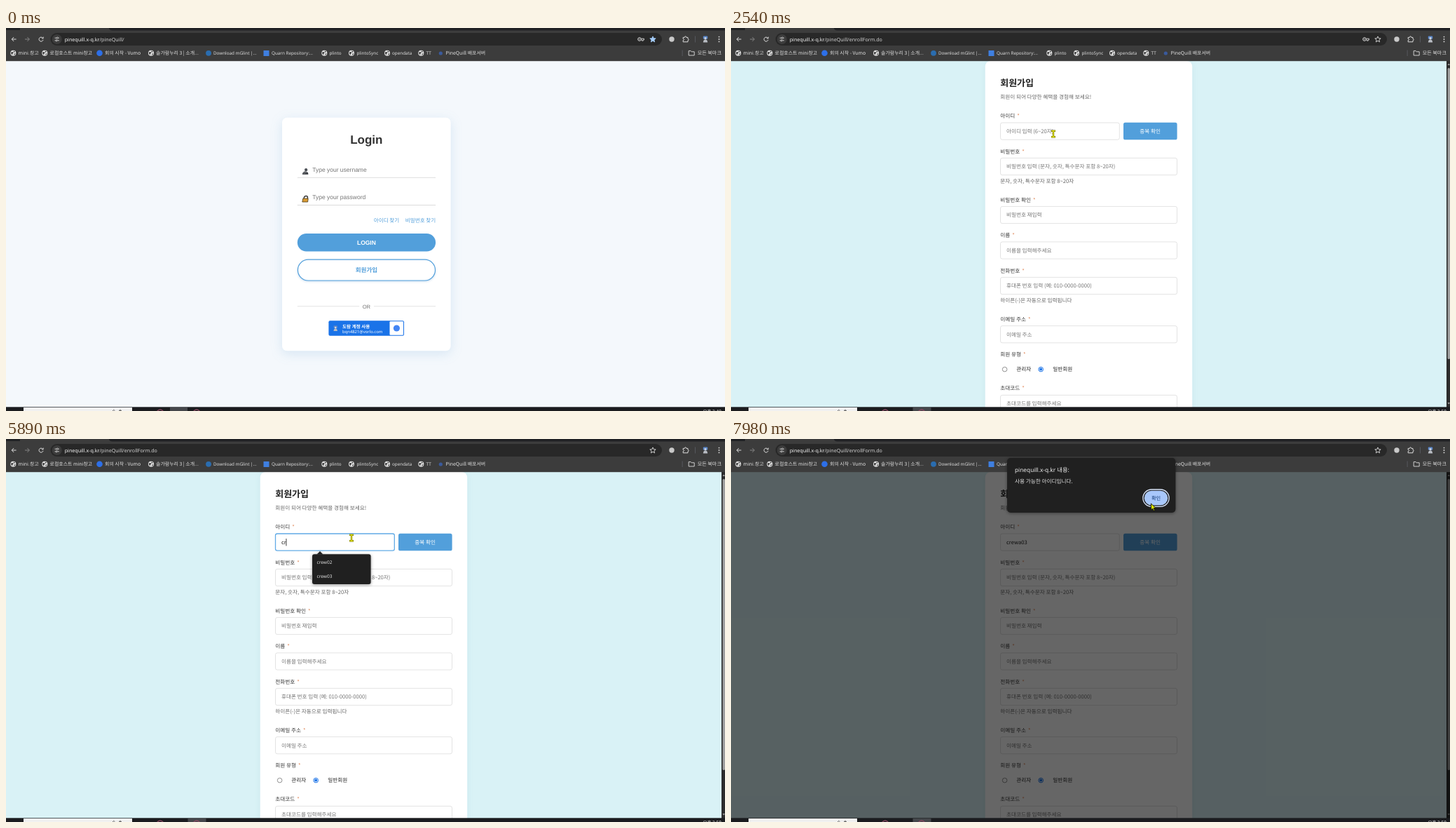
These frames come from a looping animation (1026x546 px, 8000 ms). An HTML page:

```html
<!DOCTYPE html>
<html>
<head>
<meta charset="utf-8">
<title>Sign-up walkthrough</title>
<style>
html, body { margin: 0; width: 100%; height: 100%; overflow: hidden; background: #f4f8fc; }
svg { display: block; width: 100vw; height: 100vh; }
text { text-rendering: geometricPrecision; white-space: pre; }
.kr { font-family: "Noto Sans CJK KR", "Noto Sans CJK", "Noto Sans", sans-serif; }
.ui { font-family: "Noto Sans", "Noto Sans CJK KR", "Noto Sans CJK", sans-serif; }
.ar { font-family: "Liberation Sans", Arial, sans-serif; }
.mid { text-anchor: middle; }
.b { font-weight: 700; }
.m { font-weight: 500; }
#loginCard { filter: drop-shadow(0 4px 8px rgba(70, 140, 200, .17)); }
#formCard { filter: drop-shadow(0 2px 4px rgba(40, 110, 130, .08)); }
#join { filter: drop-shadow(0 1px 1.5px rgba(70, 140, 200, .3)); }
#box, #list { filter: drop-shadow(0 1px 2px rgba(0, 0, 0, .4)); }
</style>
</head>
<body>
<svg id="stage" viewBox="0 0 1026 546" preserveAspectRatio="none"></svg>
<script>
const LOOP = 8000;
const BLUE = '#529fdb';
const BODY = 7.62;
const HOST = 'pinequill.x-q.kr';
const TYPED = 'crewa03';
const NAMES = ['owner', 'ownera', 'ownerb', 'crew02', 'crew03', 'demo01'];

// --- drawing helpers
const text = (x, y, s, size, fill, cls = 'kr', more = '') =>
  `<text x="${x}" y="${y}" font-size="${size}" fill="${fill}" class="${cls}" ${more}>${s}</text>`;
const rect = (x, y, w, h, fill, rx = 0, more = '') =>
  `<rect x="${x}" y="${y}" width="${w}" height="${h}" fill="${fill}" rx="${rx}" ${more}/>`;
const disc = (x, y, r, fill, more = '') =>
  `<circle cx="${x}" cy="${y}" r="${r}" fill="${fill}" ${more}/>`;
const line = (d, stroke, w = 1, more = '') =>
  `<path d="${d}" fill="none" stroke="${stroke}" stroke-width="${w}" ${more}/>`;
const shape = (d, fill, more = '') => `<path d="${d}" fill="${fill}" ${more}/>`;
const group = (id, body, more = '') => `<g id="${id}" ${more}>${body}</g>`;
const at = (x, y, body) => `<g transform="translate(${x} ${y})">${body}</g>`;

const globe = x => at(x, 35.7, disc(0, 0, 4, '#e3e3e3') +
  shape('M-3.2-1.2L-.6-1.6L.2 0L-1.2 1L-1 2.9Q-3.4 1.6-3.2-1.2ZM.6-3.2L2.6-2.2L1.4-.8L.4-1.8ZM1.2 1L3.2.6Q2.8 2.4 1.2 3Z', '#3c3c3c'));

const portrait = (x, y, k) => `<g transform="translate(${x} ${y}) scale(${k})">` +
  rect(-3.2, -4.6, 6.4, 4.4, '#5b87c9', 1) + disc(0, -1.4, 1.5, '#d7dbe2') +
  shape('M-3.2 4.4Q-2.6 .2 0 .2T3.2 4.4Z', '#b9bdc4') + '</g>';

const starPath = (x, y, r) => 'M' + Array.from({ length: 10 }, (_, i) => {
  const a = i * Math.PI / 5, q = i % 2 ? r * .45 : r;
  return (x + q * Math.sin(a)).toFixed(2) + ' ' + (y - q * Math.cos(a)).toFixed(2);
}).join('L') + 'Z';

// --- browser frame
function browser() {
  const ink = '#dedede';
  const marks = [
    [17.5, 'mini.창고'], [62.5, '로컬호스트 mini창고'], [141, '회의 시작 - Vumo'],
    [214, '솔가람누리 3 | 소개...'], [296, 'Download mGlint |...'], [379, 'Quarn Repository:...'],
    [461.5, 'plinto'], [500.5, 'plintoSync'], [551, 'opendata'], [599.5, 'TT'], [627.5, 'PineQuill 배포서버'],
  ];
  const hangul = /[가-힣]/;
  return rect(0, 0, 1026, 47.2, '#3c3c3c') + rect(0, 0, 20, 3, '#202124') +
    shape('M147 0H1026V3.4H152Q147 3.4 147 0Z', '#202124') +
    rect(63.5, 7, 872.5, 18, '#282828', 9) + disc(72.7, 16, 7, '#3c3c3c') +
    line('M14.6 16H8.4M11.2 13L8.2 16L11.2 19', ink, 1) +
    line('M27 16H33.2M30.4 13L33.4 16L30.4 19', '#858585', 1) +
    line('M52.4 14.2A3 3 0 1 0 53 16.8M53.2 12.6V14.8H51', ink, 1) +
    line('M69.6 14.2H72M74.8 14.2H75.8M69.6 17.8H70.6M73.4 17.8H75.8', ink, .9) +
    disc(73.4, 14.2, 1.1, 'none', `stroke="${ink}" stroke-width=".8"`) +
    disc(72, 17.8, 1.1, 'none', `stroke="${ink}" stroke-width=".8"`) +
    `<text x="83.7" y="18.6" font-size="7.1" class="ui" fill="#f4f4f4">${HOST}<tspan id="path" fill="#d0d0d0"></tspan></text>` +
    group('key', disc(904, 16, 2.3, 'none', `stroke="${ink}" stroke-width="1"`) + disc(904, 16, .7, ink) +
      line('M906.4 15.2H910.4V17H909.2V18.2H907.6V17H906.4', ink, .9)) +
    `<path id="fav" d="${starPath(923, 16.3, 4.4)}" stroke-width=".9"/>` +
    disc(950, 16, 3.7, '#c9c9c9') +
    line('M966.2 13.4H968.4Q968.6 11.8 969.6 11.8T970.8 13.4H973V15.4Q974.2 15.6 974.2 16.6T973 17.8V19.8H966.2V17.6Q967.6 17.4 967.6 16.5T966.2 15.4Z', ink, 1) +
    rect(983.2, 11.5, .8, 9, '#5c5f66') + portrait(998, 16, 1) +
    [12.6, 16, 19.4].map(y => disc(1017.5, y, .9, ink)).join('') +
    [10.3, 55.3, 207, 454.3, 493, 544, 592.3].map(globe).join('') +
    disc(133.5, 35.8, 4.3, '#2d6fe8') + disc(289, 35.8, 3.9, '#2a6db0') +
    rect(367.5, 32, 8, 8, '#3f7fe0') + disc(620.3, 36, 2.6, '#3a5a9c') +
    marks.map(([x, s]) => hangul.test(s)
      ? text(x, 38.2, s, 6.95, ink) : text(x, 38, s, 6.3, ink, 'ui')).join('') +
    rect(964.7, 31.5, .8, 8.5, '#5c5f66') +
    line('M974.2 32.6H977.2L978.2 33.8H982.2V39H974.2Z', ink, .9) +
    text(986.7, 38.2, '모든 북마크', 7.1, ink);
}

// --- login page
function login() {
  const user = disc(.9, -2.2, 2.1, '#4b4f55') + shape('M-4.4 4.4Q-4 .4 0 .2T4.2 4.4Z', '#33363b') +
    line('M-3 2.6L3.4 1', '#b9bcc2', .7);
  const lock = line('M-2.2 0Q-2-4.2 1-4.2T3-.4', '#3a3a3a', 1.5) +
    shape('M-3.4-.6H4L3.4 4.4H-4.4Z', '#d99a32', 'stroke="#4a3a1c" stroke-width=".8"');
  return rect(0, 47, 1026, 494, '#f4f8fc') +
    group('loginCard', rect(394, 127.7, 240.6, 332.6, '#fff', 7)) +
    text(514.3, 164.6, 'Login', 17, '#333', 'ar b mid') +
    at(427.2, 204.4, user) + at(427.2, 243.6, lock) +
    text(437.2, 204.5, 'Type your username', 8.5, '#757575', 'ar') +
    text(437.2, 243.6, 'Type your password', 8.5, '#757575', 'ar') +
    rect(415.8, 212.8, 197.3, .8, '#d4d4d4') + rect(415.8, 252, 197.3, .8, '#d4d4d4') +
    text(524.8, 277.2, '아이디 찾기', 7.55, BLUE) + text(569.8, 277.2, '비밀번호 찾기', 7.55, BLUE) +
    rect(415.8, 293, 197.3, 25.6, BLUE, 12.8) + text(514.4, 308.6, 'LOGIN', 8.5, '#fff', 'ar b mid') +
    rect(416.4, 330.2, 196.1, 29.8, '#fff', 14.9, `id="join" stroke="${BLUE}" stroke-width="1.2"`) +
    text(514.4, 348.2, '회원가입', 8.5, BLUE, 'kr b mid') +
    rect(415.8, 396.4, 88.4, .8, '#dcdcdc') + rect(525, 396.4, 88.1, .8, '#dcdcdc') +
    text(514.4, 399.8, 'OR', 7.6, '#777', 'ar mid') +
    rect(460.4, 417.2, 107.6, 21.6, '#1a73e8', 2) + rect(547.5, 418.2, 19.5, 19.6, '#fff', 1.2) +
    disc(557.4, 428, 4.6, '#4285f4') + portrait(470.2, 428.2, .85) +
    text(480, 427.5, '도람 계정 사용', 6.6, '#fff', 'kr b') +
    text(480, 434.8, 'bqn4821@vorlo.com', 5.9, '#fff', 'ui');
}

// --- sign-up page: [label, label centre, field top, placeholder, hint]
const FIELDS = [
  ['아이디', 125.5, 135, '아이디 입력 (6~20자)'],
  ['비밀번호', 176, 185.4, '비밀번호 입력 (문자, 숫자, 특수문자 포함 8~20자)', '문자, 숫자, 특수문자 포함 8~20자'],
  ['비밀번호 확인', 245, 254.4, '비밀번호 재입력'],
  ['이름', 295.5, 304.9, '이름을 입력해주세요'],
  ['전화번호', 346, 355.4, '휴대폰 번호 입력 (예: 010-0000-0000)', '하이픈(-)은 자동으로 입력됩니다'],
  ['이메일 주소', 415, 424.6, '이메일 주소'],
  ['회원 유형', 465.4],
  ['초대코드', 513.6, 523.4, '초대코드를 입력해주세요'],
];
const fieldWidth = i => i ? 252 : 169.8;

function signup() {
  let s = rect(0, 47, 1026, 494, '#d9f2f6') +
    group('formCard', rect(362.7, 47, 295.5, 520, '#fff', 8)) +
    text(384.2, 83.4, '회원가입', 13, '#222', 'kr b') +
    text(384.2, 101.2, '회원이 되어 다양한 혜택을 경험해 보세요!', BODY, '#666');
  FIELDS.forEach(([label, mid, top, hint, note], i) => {
    s += text(384.2, mid + 2.7, `${label}<tspan dx="3" fill="#e08a5c" font-weight="400">*</tspan>`, BODY, '#333', 'kr m');
    if (!top) return;
    s += rect(384.5, top, fieldWidth(i), 24.2, '#fff', 2.6, `stroke="#d0d0d0" stroke-width=".6" ${i ? '' : 'id="idField"'}`) +
      text(392.9, top + 14.9, hint, BODY, '#757575', 'kr', i ? '' : 'id="idText"');
    if (note) s += text(384.2, top + 35.6, note, BODY, '#666');
  });
  return s + rect(392.7, 142, .8, 10.4, '#111', 0, 'id="caret"') +
    rect(560, 134.8, 76.6, 24.5, BLUE, 2.6) + text(598.2, 149.9, '중복 확인', BODY, '#fff', 'kr m mid') +
    disc(390.6, 486.6, 3.3, '#fff', 'stroke="#767676" stroke-width=".8"') +
    disc(442.2, 486.6, 3.3, '#fff', 'stroke="#1a73e8" stroke-width="1"') + disc(442.2, 486.6, 2, '#1a73e8') +
    text(407.2, 489.4, '관리자', BODY, '#222', 'kr m') + text(459.2, 489.4, '일반회원', BODY, '#222', 'kr m') +
    rect(1021, 47, 5, 494, '#2c2c2c') + rect(1022.6, 57, 3.4, 415, '#9f9f9f', 1.6) +
    shape('M1022.4 53L1024.3 50.4L1026 53ZM1022.4 534L1024.3 536.6L1026 534Z', '#9f9f9f');
}

const dropdown = () => rect(437, 164.2, 83.6, 120, '#202020', 3, 'id="panel"') +
  shape('M443.6 164.6L448 160L452.4 164.6Z', '#202020') +
  NAMES.map((_, i) => text(443.6, 178.2 + i * 19.3, '', 6.5, '#e3e3e3', 'ui', `id="name${i}"`)).join('');

const alertBox = () => group('box', rect(394, 27, 240.4, 78, '#202020', 5)) +
  text(405, 46.8, HOST + ' 내용:', 8.3, '#ececec', 'ui') +
  text(405, 62.7, '사용 가능한 아이디입니다.', BODY, '#e3e3e3') +
  rect(587.9, 72, 37.2, 24.4, '#202020', 12.2, 'stroke="#dbe7fd" stroke-width="1.3"') +
  rect(589.8, 73.8, 33.4, 20.8, '#a8c7fa', 10.4) +
  text(606.5, 86.8, '확인', 7.2, '#0b3470', 'kr mid');

const taskbar = () => rect(0, 540.3, 1026, 6, '#1b1c1f') + rect(25, 541, 155, 5, '#f1f1f1') +
  line('M152 546L153.8 544.4L155.6 546M161 545.4H165M163 543.8V546', '#555', .9) +
  rect(234, 541, 25, 5, '#45474b', 0, 'id="taskA"') + rect(259.5, 541, 26, 5, '#45474b', 0, 'id="taskB"') +
  [220, 272].map(x => line(`M${x - 4.5} 546.5Q${x} 541.6 ${x + 4.5} 546.5`, '#8a4a62', 1.4)).join('') +
  text(994.5, 548.6, '', 6.6, '#eee', 'kr', 'id="clock"');

const edge = 'stroke="#111" stroke-width=".9" stroke-linejoin="round"';
const pointers = () => disc(0, 1.5, 6.2, 'rgba(255,255,0,.45)', 'id="spot"') +
  shape('M0 0V9.2L2.2 7.2L3.7 10.3L5.2 9.6L3.8 6.6H6.8Z', '#dde600', edge + ' id="arrow"') +
  shape('M-1 .8Q0-.8 1 .8V4L5.2 5Q6.2 5.4 5.9 6.8L5 10.6H.4L-2.8 6.6Q-2.6 5.2-1 6.2Z', '#f0f000', edge + ' id="hand"') +
  group('ibeam', line('M-3-4.3H3M0-4.3V4.3M-3 4.3H3', '#6b6b00', 2.4) + line('M-2.6-4.3H2.6M0-4.3V4.3M-2.6 4.3H2.6', '#e4e400', 1.3));

document.getElementById('stage').innerHTML =
  group('login', login()) + group('signup', signup()) + group('list', dropdown()) +
  rect(0, 47, 1026, 494, 'rgba(0,0,0,.6)', 0, 'id="scrim"') +
  browser() + taskbar() + group('alert', alertBox()) + group('cursor', pointers());

const $ = id => document.getElementById(id);
const show = (id, on) => $(id).setAttribute('display', on ? 'inline' : 'none');
const set = (id, map) => { for (const k in map) $(id).setAttribute(k, map[k]); };

// --- pointer: [start, end, steps, from, bend, to]
const MOVES = [
  [70, 510, 7, [640, 556], [570, 400], [560, 363]],
  [770, 1250, 8, [560, 363], [535, 328], [536, 347]],
  [2060, 2540, 8, [536, 347], [500, 200], [460, 151]],
  [2800, 2940, 3, [460, 151], [700, 160], [1034, 212]],
  [4990, 5390, 7, [640, 556], [540, 190], [493, 141]],
  [6500, 6840, 6, [493, 141], [560, 150], [604.2, 150.2]],
  [6970, 7250, 5, [604.2, 150.2], [602, 134], [596, 124]],
  [7310, 7770, 7, [596, 124], [550, 98], [596, 91]],
  [7980, 7981, 1, [596, 91], [598, 92], [599.4, 92]],
];

function pointerAt(t) {
  const move = MOVES.filter(m => m[0] <= t).pop();
  if (!move) return [640, 570];
  const [a, b, n, p, c, q] = move;
  const k = Math.floor((Math.min(t, b) - a) / (b - a) * (n - 1) + 1e-6);
  const u = (k + 1) / n, v = 1 - u;
  return [0, 1].map(i => v * v * p[i] + 2 * u * v * c[i] + u * u * q[i]);
}

const inside = (x, y, l, t, w, h) => x > l && x < l + w && y > t && y < t + h;
function pointerKind(t, x, y) {
  if (t < 1520) return inside(x, y, 416, 330, 197, 30) ? 'hand' : 'arrow';
  if (t >= 6970) return 'arrow';
  if (inside(x, y, 560, 135, 77, 25)) return 'hand';
  return FIELDS.some((f, i) => f[2] && inside(x, y, 384, f[2], fieldWidth(i), 24)) ? 'ibeam' : 'arrow';
}

const KEYS = [5820, 5890, 5960, 6030, 6090, 6230, 6360];
const between = (t, a, b) => t >= a && t < b;

function render(t) {
  const form = t >= 1520;
  show('login', !form);
  show('signup', form);
  $('path').textContent = '/pineQuill/' + (form ? 'enrollForm.do' : '');
  set('fav', form ? { fill: 'none', stroke: '#dedede' } : { fill: '#a5cdfa', stroke: '#a5cdfa' });
  show('key', t < 5750);
  show('taskA', t < 70);
  show('taskB', between(t, 70, 3670) || t >= 5530);
  $('clock').textContent = t < 770 ? '오후 2:49' : '오후 2:50';

  const count = KEYS.filter(k => k <= t).length;
  const word = TYPED.slice(0, count);
  const focus = between(t, 5390, 6770);
  $('idText').textContent = word || FIELDS[0][3];
  set('idText', { fill: word ? '#222' : '#757575' });
  set('idField', { stroke: focus ? '#62abe6' : '#d0d0d0', 'stroke-width': focus ? 1.3 : .6 });
  show('caret', focus);
  set('caret', { x: 392.7 + (word ? $('idText').getComputedTextLength() : 0) });

  const hits = NAMES.filter(n => n.startsWith(word));
  show('list', between(t, 5460, 6500) && hits.length);
  set('panel', { height: 4.2 + hits.length * 19.3 });
  NAMES.forEach((_, i) => { $('name' + i).textContent = hits[i] || ''; });

  show('scrim', t >= 6900);
  show('alert', t >= 6900);
  const [alpha, lift] = t < 6970 ? [.035, -10] : t < 7040 ? [.6, -3] : [1, 0];
  set('alert', { opacity: alpha, transform: `translate(0 ${lift})` });

  const [x, y] = pointerAt(t), kind = pointerKind(t, x, y);
  set('cursor', { transform: `translate(${x.toFixed(2)} ${y.toFixed(2)})` });
  ['arrow', 'hand', 'ibeam'].forEach(k => show(k, k === kind));
  show('spot', between(t, 1180, 1250) || between(t, 5390, 5550) || between(t, 6770, 6900));
  set('spot', { cy: kind === 'ibeam' ? 0 : 1.5 });
  set('join', { fill: !form && kind === 'hand' ? '#f0f7fd' : '#fff' });
}

const start = performance.now();
function tick() {
  render((performance.now() - start) % LOOP);
  requestAnimationFrame(tick);
}
tick();
</script>
</body>
</html>
```
